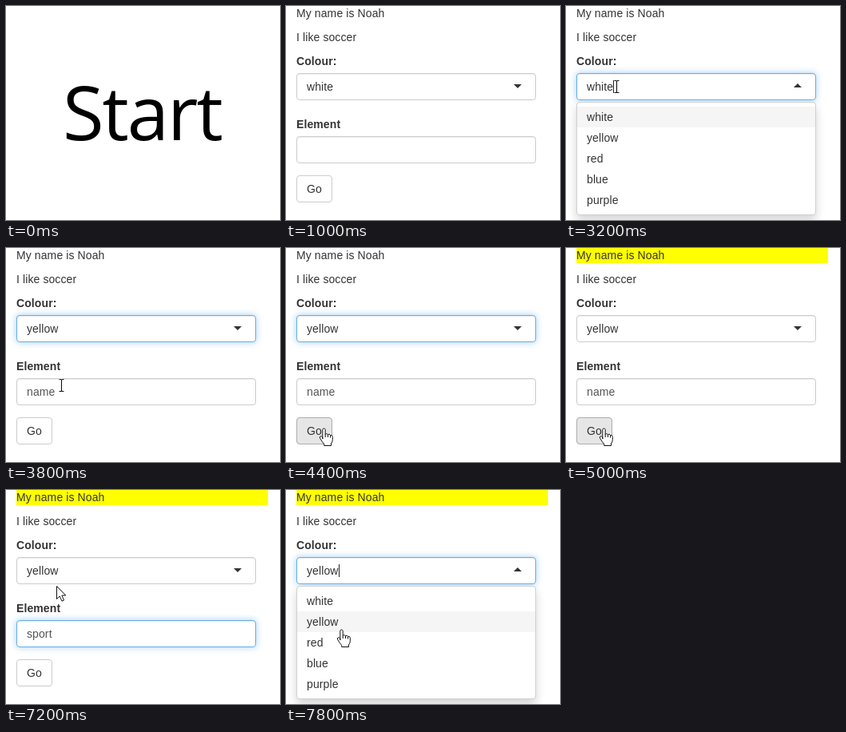
Recreate the animation shown at these times as an HTML page. Size 343 by 268 pixels, loop 8 s.

```html
<!DOCTYPE html>
<html lang="en">
<head>
<meta charset="utf-8">
<title>Form demo</title>
<style>
  html, body { margin: 0; width: 100%; height: 100%; overflow: hidden; background: #fff; }
  #stage {
    position: relative; width: 343px; height: 268px; overflow: hidden; background: #fff;
    font: 14px/20px "Liberation Sans", Arial, sans-serif; letter-spacing: .1px; color: #333;
  }
  #stage *, #stage *::before { box-sizing: border-box; }
  #stage [hidden] { display: none; }
  #intro {
    position: absolute; left: 71px; top: 68px; line-height: 128px; white-space: nowrap;
    font-family: "Open Sans", sans-serif; font-size: 94px; letter-spacing: -2px; color: #000;
  }
  #form > * { position: absolute; left: 13px; white-space: pre; }
  .line { width: 315px; height: 20px; }
  .yellow { background: #ff0; }
  .label { font-weight: bold; }
  .field {
    width: 300px; height: 34px; padding: 6px 12px;
    border: 1px solid #ccc; border-radius: 4px; background: #fff;
    box-shadow: inset 0 1px 1px rgba(0, 0, 0, .075);
  }
  .focus {
    border-color: #66afe9;
    box-shadow: inset 0 1px 1px rgba(0, 0, 0, .075), 0 0 8px rgba(102, 175, 233, .6);
  }
  #input { color: #555; }
  .field span { display: inline-block; height: 16px; line-height: 16px; margin-top: 2px; vertical-align: top; }
  .field.caret span { box-shadow: 1px 0 #222; }
  .field.marked span { background: #3390ff; color: #fff; }
  #select::before {
    content: ""; position: absolute; left: 271px; top: 13px;
    border: 5px solid transparent; border-top-color: #333; border-bottom-width: 0;
  }
  #select.open::before { top: 12px; border-width: 0 5px 5px; border-color: transparent transparent #333; }
  #go {
    width: 45px; height: 34px; padding: 6px 12px;
    border: 1px solid #ccc; border-radius: 4px; background: #fff;
  }
  #go.hover { background: #e6e6e6; border-color: #adadad; }
  #go.active { background: #d4d4d4; border-color: #8c8c8c; box-shadow: inset 0 3px 5px rgba(0, 0, 0, .125); }
  #menu {
    top: 120px; width: 300px; height: 142px; padding: 5px 0; background: #fff;
    border: 1px solid #d0d0d0; border-radius: 4px; box-shadow: 0 6px 12px rgba(0, 0, 0, .175);
  }
  #menu div { height: 26px; padding: 3px 12px; }
  #menu .on { background: #f5f5f5; }
  #cursors { position: absolute; inset: 0; fill: #fff; stroke: #111; stroke-linejoin: round; }
</style>
</head>
<body>
<div id="stage">
  <div id="intro">Start</div>
  <div id="form" hidden>
    <div id="line" class="line" style="top:-1px">My name is Noah</div>
    <div class="line" style="top:29px">I like soccer</div>
    <div class="label" style="top:59px">Colour:</div>
    <div id="select" class="field" style="top:84px"><span></span></div>
    <div class="label" style="top:138px">Element</div>
    <div id="input" class="field" style="top:163px"><span></span></div>
    <div id="go" style="top:212px">Go</div>
    <div id="menu"></div>
  </div>
  <svg id="cursors" width="343" height="268">
    <g id="beam">
      <path fill="none" stroke="#fff" stroke-width="2.6" d="M-3-7.5H-1Q0-7.5 0-6.5Q0-7.5 1-7.5H3M0-6.5V6.5M-3 7.5H-1Q0 7.5 0 6.5Q0 7.5 1 7.5H3"/>
      <path fill="none" stroke-width="1.1" d="M-3-7.5H-1Q0-7.5 0-6.5Q0-7.5 1-7.5H3M0-6.5V6.5M-3 7.5H-1Q0 7.5 0 6.5Q0 7.5 1 7.5H3"/>
    </g>
    <path id="arrow" d="M.5.5V16.5L4.2 13L7 19.2L9.6 18L6.9 12H11.8Z"/>
    <g id="hand">
      <path d="M-1.7 13V1.5Q-1.5 0 0 0Q1.5 0 1.7 1.5V7.3Q3.2 5.7 5 7.6Q6.6 6.4 8 8.4Q10.6 7.8 10.8 10.4V14.5Q10.6 17 9 18.8V21.5H.2V19.5Q-2 17-4.6 12.8Q-6 10.4-4.4 9.8Q-3 9.4-1.7 11.2Z"/>
      <path fill="none" d="M1.7 7V11M5 8V11M8 9V11.5"/>
    </g>
  </svg>
</div>
<script>
const LOOP = 8000;
const OPTIONS = ["white", "yellow", "red", "blue", "purple"];
const $ = id => document.getElementById(id);

// Each step changes only the listed properties; the rest carry over.
const steps = [
  [0, { intro: true, colour: "white", text: "", focus: "", caret: "", menu: "", go: "", band: false, marked: false, cursor: [] }],
  [1000, { intro: false }],
  [1600, { focus: "input", caret: "input", cursor: ["beam", 72.5, 178] }],
  [2000, { text: "n" }],
  [2200, { text: "nam" }],
  [2400, { text: "name" }],
  [2800, { caret: "", cursor: ["arrow", 66, 138] }],
  [3000, { cursor: ["beam", 63.5, 101] }],
  [3200, { focus: "select", caret: "select", menu: "white" }],
  [3400, { cursor: ["hand", 67, 143] }],
  [3600, { menu: "yellow", cursor: ["hand", 69.5, 170] }],
  [3800, { menu: "", caret: "", colour: "yellow", cursor: ["beam", 69.5, 172] }],
  [4200, { cursor: ["arrow", 58, 203] }],
  [4400, { go: "hover", cursor: ["hand", 47.5, 226] }],
  [4800, { go: "active", focus: "" }],
  [5000, { go: "hover", band: true }],
  [5200, { cursor: ["hand", 50, 219] }],
  [5400, { go: "", focus: "input", caret: "input", cursor: ["beam", 58.5, 185] }],
  [5600, { marked: true, caret: "" }],
  [6000, { marked: false, text: "s" }],
  [6400, { text: "spo" }],
  [6600, { text: "sport" }],
  [7000, { cursor: ["arrow", 61, 146] }],
  [7200, { cursor: ["arrow", 63, 120] }],
  [7400, { focus: "select", caret: "select", menu: "yellow", cursor: ["beam", 64.5, 103] }],
  [7600, { menu: "white", cursor: ["hand", 67, 145] }],
  [7800, { menu: "yellow", cursor: ["hand", 69.5, 175] }]
];

const items = OPTIONS.map(name => {
  const item = document.createElement("div");
  item.textContent = name;
  $("menu").append(item);
  return item;
});

function drawField(id, value, state) {
  const field = $(id), classes = field.classList;
  field.firstElementChild.textContent = value;
  classes.toggle("focus", state.focus === id);
  classes.toggle("caret", state.caret === id);
}

function draw(state) {
  $("intro").hidden = !state.intro;
  $("form").hidden = state.intro;
  $("line").classList.toggle("yellow", state.band);
  drawField("select", state.colour, state);
  drawField("input", state.text, state);
  $("select").classList.toggle("open", !!state.menu);
  $("input").classList.toggle("marked", state.marked);
  $("go").className = state.go;
  $("menu").hidden = !state.menu;
  items.forEach((item, i) => item.classList.toggle("on", OPTIONS[i] === state.menu));
  const [kind, x, y] = state.cursor;
  for (const id of ["beam", "arrow", "hand"]) {
    $(id).style.display = id === kind ? "" : "none";
    if (id === kind) $(id).setAttribute("transform", `translate(${x} ${y})`);
  }
}

let shown = -1;
function tick() {
  const time = performance.now() % LOOP;
  const count = steps.filter(([start]) => start <= time).length;
  if (count !== shown) {
    shown = count;
    draw(Object.assign({}, ...steps.slice(0, count).map(([, change]) => change)));
  }
  requestAnimationFrame(tick);
}
tick();
</script>
</body>
</html>
```
